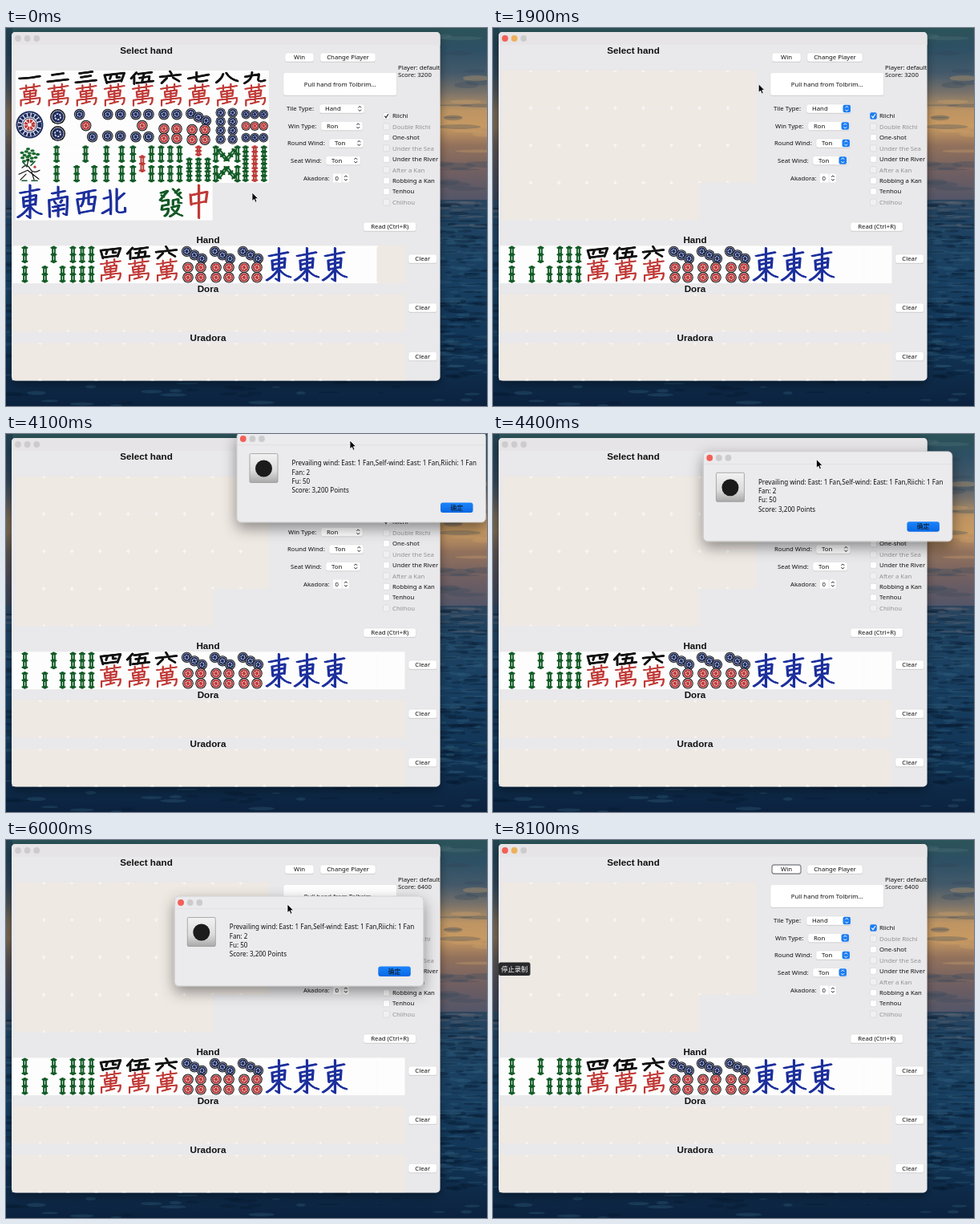
Recreate the animation shown at these times as an HTML page. Size 600 px wide and 471 px high, loop 8.2 s.

```html
<!DOCTYPE html>
<html lang="en">
<head>
<meta charset="utf-8">
<title>Mahjong hand calculator</title>
<style>
html, body { margin: 0; width: 100%; height: 100%; overflow: hidden; background: #12304b; }
#stage { display: block; width: 100vw; height: 100vh; }
text { font: 500 7.75px "Noto Sans", "Noto Sans CJK SC", sans-serif; fill: #111; white-space: pre; }
.title { font: bold 11.7px "Liberation Sans", Arial, sans-serif; }
.wide { font-size: 8.05px; }
.off { fill: #929294; }
.mid { text-anchor: middle; }
.accent { fill: none; }
.mark { stroke: #222; }
.accented .accent { fill: #1c7df3; }
.accented .mark { stroke: #fff; }
.light { fill: #cdcccd; }
.front .red, .dialog .red { fill: #f35f58; }
.front .yellow { fill: #eeb05c; }
</style>
</head>
<body>
<svg id="stage" viewBox="0 0 600 471" preserveAspectRatio="none"></svg>
<script>
const LOOP = 8200;
const BLUE = '#1c2f9c', GREEN = '#125a26', RED = '#c03a37', NAVY = '#1f2d5e', BLACK = '#111';
const stage = document.getElementById('stage');

let seed = 11;
const random = () => (seed = seed * 16807 % 2147483647) / 2147483647;
const times = (n, make) => Array.from({ length: n }, (_, i) => make(i)).join('');

const rect = (x, y, w, h, fill, more = '') =>
  `<rect x="${x}" y="${y}" width="${w}" height="${h}" fill="${fill}" ${more}/>`;
const circle = (x, y, r, fill, more = '') => `<circle cx="${x}" cy="${y}" r="${r}" fill="${fill}" ${more}/>`;
const line = (d, color, width) =>
  `<path d="${d}" fill="none" stroke="${color}" stroke-width="${width}" stroke-linecap="round" stroke-linejoin="round"/>`;
const text = (x, y, label, cls = '', id = '') =>
  `<text x="${x}" y="${y + 2.8}" class="${cls}" ${id && `id="${id}"`}>${label}</text>`;
const at = (x, y, body) => `<g transform="translate(${x} ${y})">${body}</g>`;

/* Tile faces, each in a 35 x 47 cell */
const numerals = [
  'M4 9Q17 10 31 8',
  'M10 5L25 4M4 13L31 12',
  'M9 3L26 2M11 8L24 7M4 14L31 13',
  'M5 5L8 15M5 5L31 4L27 14M8 14L27 13M14 5L12 10M21 5V9H25',
  'M10 2L3 9M7 7V16M12 4L30 3M20 4L17 15M14 9L27 8L26 14M10 15L32 14',
  'M17 1L19 4M4 7L31 6M13 9L6 15M21 9L29 14',
  'M4 9L31 6M15 2V12Q16 15 29 13',
  'M13 4Q11 10 4 14M17 3Q22 11 32 14',
  'M5 7L23 5L22 12Q23 15 31 13M14 2Q14 11 4 15'
];
const TEN_THOUSAND = 'M5 22L31 20M13 18V24M23 17V24M10 26L11 33L25 32L26 25L10 26M11 29.5L25 28.5' +
  'M18 25V39M6 43V36L31 35Q31 42 28 43M12 41L23 39';
const honors = {
  east: [BLUE, 'M5 12L30 9M10 30L9 18L26 16L25 28M10 23L25 21M10 29L25 27M18 3V44L14 41M17 30Q11 38 2 42M18 29Q25 38 33 40'],
  south: [BLUE, 'M10 13L27 11M13 23L15 26M23 22L21 25M11 30L26 28M11 35L26 33M18 28V42M18 5V17M6 21L7 42M7 21L30 18Q30 31 29 41L25 39'],
  west: [BLUE, 'M6 13L30 10M9 37L27 35M21 11V27H26M6 20L9 38M7 20L30 18L27 36M15 12Q15 25 11 29'],
  north: [BLUE, 'M4 19L13 17M31 14L22 21M12 9Q14 22 13 39M2 37L13 32M21 8V35Q22 39 32 37V32'],
  white: [BLACK, ''],
  green: [GREEN, 'M6 15L9 17M29 9L24 13M31 13L27 16M21 28V22L28 21V26H32M6 22L15 21V27L7 28' +
    'M5 12L14 10L4 21M21 8L32 20M7 28L6 33L15 32Q15 39 10 41M19 31L29 29Q27 38 17 42M20 33Q26 40 33 42'],
  red: [RED, 'M8 26L27 24M7 14L8 27M7 15L29 12L27 25M18 3V44']
};
/* A broad pen held at an angle: verticals come out thicker than horizontals */
const brush = (d, color, width, nib) => line(d, color, width) +
  at(nib / 2, nib / 5, line(d, color, width)) + at(-nib / 2, -nib / 5, line(d, color, width));
const leaning = body => `<g transform="translate(17.5 0) skewY(-4) scale(.95 1) translate(-17.5 0)">${body}</g>`;
const honor = name => leaning(brush(honors[name][1], honors[name][0], 1.9, 1.5));
const character = n => leaning(brush(numerals[n - 1], BLACK, 2.2, .9) + brush(TEN_THOUSAND, RED, 1.5, .8));

const pin = (x, y, color = NAVY, r = 6.8) => circle(x, y, r, BLACK) +
  circle(x, y, r * .8, color, `stroke="#d6d6e2" stroke-width="${r * .1}"`) +
  circle(x, y, r * .38, 'none', `stroke="#e4e4ee" stroke-width="${r * .17}" stroke-dasharray="${r * .25} ${r * .14}"`);
const pinGrid = (ys, color, xs = [9.5, 25.5], r) => ys.map(y => xs.map(x => pin(x, y, color, r)).join('')).join('');
const slope = (y, step, color) => times(3, i => pin(8 + i * 9.5, y + i * step, color, 6.6));
const dots = [
  () => circle(17.5, 21, 16, '#f2f0f6', `stroke="${NAVY}" stroke-width="2"`) +
    circle(17.5, 21, 12.3, 'none', `stroke="${NAVY}" stroke-width="4.6" stroke-dasharray="3.4 1.2"`) +
    circle(17.5, 21, 8.6, '#f6ebee', `stroke="${NAVY}" stroke-width="1"`) +
    circle(17.5, 21, 4.6, 'none', `stroke="${RED}" stroke-width="4.4" stroke-dasharray="2.6 1"`),
  () => pinGrid([11, 32], NAVY, [17.5], 9.5),
  () => pin(9.5, 8) + pin(17.5, 22, RED) + pin(25.5, 36),
  () => pinGrid([8, 35]),
  () => pinGrid([8, 36]) + pin(17.5, 22, RED),
  () => pinGrid([8]) + pinGrid([26, 38], RED),
  () => slope(7, 4.5) + pinGrid([27, 39.5], RED),
  () => pinGrid([6, 17, 28, 39], NAVY, [10, 25], 6.2),
  () => pinGrid([8, 37], NAVY, [6.5, 17.5, 28.5], 5.8) + pinGrid([22.5], RED, [6.5, 17.5, 28.5], 5.8)
];

const stick = (x, y, color = GREEN, h = 17, turn = 0) => {
  const e = h / 2;
  return `<g transform="translate(${x} ${y}) rotate(${turn})">` + line(`M0 ${-e}V${e}`, color, 4.8) +
    line(`M-2.9 ${-e}H2.9M-2.9 0H2.9M-2.9 ${e}H2.9`, color, 2.3) +
    line(`M0 ${2 - e}V-2.5M0 2.5V${e - 2}`, '#b9d9bd', 1.2) + '</g>';
};
const sticks = (xs, ys, color, h) => ys.map(y => xs.map(x => stick(x, y, color, h)).join('')).join('');
const trio = [6, 17.5, 29], pair = [11, 35.5];
const bamboos = [
  () => times(16, i => `<ellipse cx="${17 + Math.cos(i * 2.4) * Math.sqrt(i) * 3}" cy="${13 + Math.sin(i * 2.4) * Math.sqrt(i) * 2.2}"
      rx="2.6" ry="1.7" fill="#1a6a2f"/>`) +
    line('M16 17L14 27M8 28Q14 22 18 29T30 31M4 36L15 31L29 42M6 43L13 36M20 33L23 43', BLACK, 1.2) +
    line('M9 21L14 26M24 20L19 25M8 44H14M20 44H27', GREEN, 1.6) + circle(24, 27, 1.6, RED),
  () => sticks([16], pair),
  () => stick(17, pair[0]) + sticks([6, 28], [pair[1]]),
  () => sticks([8, 27], pair),
  () => sticks([6, 29], pair) + stick(17.5, 23, RED),
  () => sticks(trio, pair),
  () => stick(17.5, 7, RED, 9) + sticks(trio, [23, 38], GREEN, 11),
  () => sticks([4, 31], pair) + stick(12.5, 12, GREEN, 14, -40) + stick(22.5, 12, GREEN, 14, 40) +
    stick(12.5, 34, GREEN, 14, 40) + stick(22.5, 34, GREEN, 14, -40),
  () => sticks([6, 29], [8, 23, 38], GREEN, 11) + sticks([17.5], [8, 23, 38], RED, 11)
];
const paletteRows = [
  numerals.map((_, i) => character(i + 1)),
  dots.map(draw => draw()),
  bamboos.map(draw => draw()),
  Object.keys(honors).map(honor)
];
const handTiles = [
  ...[2, 3, 6].map(n => bamboos[n - 1]()),
  ...[4, 5, 6].map(character),
  ...[7, 7, 7].map(n => dots[n - 1]()),
  ...['east', 'east', 'east', 'white'].map(honor)
];

/* Empty slots: beige cells whose rounded corners leave small sparkles */
const STAR = 'M0-3Q.5-.5 3 0Q.5.5 0 3Q-.5.5-3 0Q-.5-.5 0-3Z';
const slots = (x, y, columns, w = 35, h = 46.6) =>
  `<svg x="${x}" y="${y}" width="${columns * w}" height="${h}">` + rect(0, 0, columns * w, h, '#efe9e3') +
  times(columns - 1, i => [0, h].map(v =>
    `<path d="${STAR}" transform="translate(${(i + 1) * w} ${v})" fill="#faf8f5"/>`).join('')) + '</svg>';

const PALETTE = { x: 12, y: 53, w: 35.1, h: 46.6 };
const rowY = i => PALETTE.y + i * PALETTE.h;
const palette = paletteRows.map((row, r) =>
  rect(PALETTE.x, rowY(r), row.length * PALETTE.w, PALETTE.h + .2, '#fdfdfd') +
  row.map((face, i) => at(PALETTE.x + i * PALETTE.w, rowY(r), face)).join('')).join('');
const emptyPalette = paletteRows.map((row, r) => slots(PALETTE.x, rowY(r), row.length, PALETTE.w)).join('');

/* Controls */
const button = (x, y, w, h, label, id = '') =>
  rect(x, y + .7, w, h, '#c9c8ca', 'rx="2.8"') +
  rect(x, y, w, h, '#fff', `rx="2.8" stroke="#dad9db" stroke-width=".5" ${id && `id="${id}"`}`) +
  text(x + w / 2, y + h / 2, label, 'mid');
const chevrons = (x, y, cls) =>
  `<path class="${cls}" d="M${x - 1.8} ${y - 1.2}l1.8-1.9l1.8 1.9M${x - 1.8} ${y + 1.2}l1.8 1.9l1.8-1.9" fill="none" stroke="#222" stroke-width="1"/>`;
const combo = (label, labelX, x, y, w, value) => text(labelX, y, label) +
  button(x, y - 5.5, w, 11, '') + text(x + 7, y, value) +
  `<rect x="${x + w - 10.5}" y="${y - 4.8}" width="9.6" height="9.6" rx="2.2" class="accent"/>` +
  chevrons(x + w - 5.7, y, 'mark');
const checkbox = (label, i) => {
  const y = 109.5 + i * 13.45, off = [1, 3, 5, 8].includes(i);
  return rect(470.5, y - 4, 8, 8, off ? '#f1f0f1' : '#fff', 'rx="1.8" stroke="#d2d1d3" stroke-width=".6"') +
    (i ? '' : `<rect x="470.3" y="${y - 4.2}" width="8.4" height="8.4" rx="1.9" class="accent"/>` +
      `<path class="mark" d="M472.4 ${y + .2}l1.6 2.1l2.9-4.6" fill="none" stroke-width="1.2"/>`) +
    text(482, y, label, off ? 'off' : '');
};
const lights = (x, y) => ['red', 'yellow', 'green'].map((c, i) =>
  `<circle cx="${x + i * 11.6}" cy="${y}" r="3.9" class="light ${c}"/>`).join('');

const controls =
  button(348, 31, 36, 11, 'Win', 'win') + button(392, 31, 69, 11, 'Change Player') +
  text(489, 49.5, 'Player: default') + text(489, 58.5, '', '', 'score') +
  button(346, 55.5, 141.5, 28.5, 'Pull hand from Tolbrim...') +
  combo('Tile Type:', 350, 391, 100.5, 56, 'Hand') +
  combo('Win Type:', 352, 393, 122, 52, 'Ron') +
  combo('Round Wind:', 351, 403, 143.5, 43, 'Ton') +
  combo('Seat Wind:', 355, 399, 165, 43, 'Ton') +
  text(371, 187, 'Akadora:') + rect(408, 181.5, 10.5, 11, '#fff') + text(410.5, 187, '0') +
  rect(419.5, 181.5, 8.5, 11, '#fff', 'rx="2.5"') + chevrons(423.8, 187, '') +
  ['Riichi', 'Double Riichi', 'One-shot', 'Under the Sea', 'Under the River', 'After a Kan',
    'Robbing a Kan', 'Tenhou', 'Chiihou'].map(checkbox).join('') +
  button(446, 242, 65.5, 11, 'Read (Ctrl+R)') +
  [287.5, 348.5, 409].map(y => button(502, y - 5.5, 35.5, 11, 'Clear')).join('');

const title = (x, y, label) => text(x, y + 1.3, label, 'title mid');
const mainWindow =
  rect(7, 5, 534.5, 434.5, '#e9e8ea', 'rx="5" filter="url(#shadow)"') +
  `<path d="M7 21V10Q7 5 12 5H536.5Q541.5 5 541.5 10V21Z" fill="#e6e4e6"/>` + lights(15, 13) +
  `<g id="empty">${emptyPalette}</g>` +
  `<g id="palette">${palette}${rect(152.4, 192.8, 35.1, 46.8, '#adadad', 'id="pressed"')}</g>` +
  slots(7.5, 271.3, 14) + rect(7.5, 271.3, 455, 46.8, '#fdfdfd') +
  handTiles.map((face, i) => at(7.5 + i * 35, 271.3, face)).join('') +
  rect(462.3, 271.3, 35.2, 46.8, '#fdfdfd', 'id="drawn"') +
  slots(7.5, 332, 14) + slots(7.5, 392.6, 14) +
  title(175, 28, 'Select hand') + title(252, 264, 'Hand') +
  title(252, 325, 'Dora') + title(252, 385.5, 'Uradora') + controls;

const dialog =
  rect(0, 0, 310.5, 112, '#ebeaec', 'rx="5.5" stroke="#bcbcbe" stroke-width=".6" filter="url(#deep)"') +
  rect(.5, 15.5, 309.5, .6, '#dbdadc') + lights(7.8, 8) +
  '<g id="message">' +
  rect(16, 26.5, 35, 36, 'url(#metal)', 'rx="1.5" stroke="#8f8f8f" stroke-width=".7"') + circle(33.5, 45, 10.5, '#1b1b1b') +
  ['Prevailing wind: East: 1 Fan,Self-wind: East: 1 Fan,Riichi: 1 Fan', 'Fan: 2', 'Fu: 50', 'Score: 3,200 Points']
    .map((s, i) => text(68.5, 38.5 + i * 11.2, s, 'wide')).join('') +
  rect(254, 87.5, 40.5, 12.5, 'url(#blue)', 'rx="3"') + text(274.2, 93.7, '确定', 'mid') + '</g>';

/* Desktop */
const gradient = (id, stops) => `<linearGradient id="${id}" x2="0" y2="1">` +
  stops.map(([o, c]) => `<stop offset="${o}" stop-color="${c}"/>`).join('') + '</linearGradient>';
const blob = (x, y, rx, ry, fill, opacity) =>
  `<ellipse cx="${x}" cy="${y}" rx="${rx}" ry="${ry}" fill="${fill}" opacity="${opacity}"/>`;
const desktop = rect(0, 0, 600, 215, 'url(#sky)') + rect(0, 214, 600, 257, 'url(#sea)') +
  rect(0, 0, 8, 214, '#142c40', 'opacity=".45"') +
  times(26, () => {
    const y = 10 + random() * 200;
    return blob(545 + random() * 55, y, 10 + random() * 20, 1 + random() * 3,
      random() > .45 ? '#33465a' : y > 60 ? '#d3a56c' : '#56787a', .3);
  }) +
  times(260, () => {
    const y = 217 + random() * 254, x = y > 436 ? random() * 600 : random() > .12 ? 540 + random() * 60 : random() * 8;
    return blob(x, y, 3 + random() * 14, .6 + random() * 1.8,
      random() > .4 ? '#06172d' : y < 250 ? '#6d6c76' : '#33617f', .34);
  });

stage.innerHTML = '<defs>' +
  gradient('sky', [[0, '#2b5358'], [.12, '#2d5064'], [.26, '#43596a'], [.37, '#77716a'], [.48, '#bd9463'], [.57, '#c89a62'],
    [.68, '#93725c'], [.84, '#705f62'], [1, '#525568']]) +
  gradient('sea', [[0, '#2c455e'], [.1, '#1f4260'], [.4, '#183f61'], [.7, '#113556'], [1, '#0b223e']]) +
  gradient('metal', [[0, '#f2f2f2'], [.6, '#dcdcdc'], [1, '#a9a9a9']]) +
  gradient('blue', [[0, '#1a84fb'], [1, '#0968e4']]) +
  '<filter id="shadow" x="-10%" y="-10%" width="120%" height="120%"><feDropShadow dx="0" dy="4" stdDeviation="6" flood-opacity=".4"/></filter>' +
  '<filter id="deep" x="-20%" y="-30%" width="140%" height="180%"><feDropShadow dx="0" dy="7" stdDeviation="9" flood-opacity=".42"/></filter>' +
  '</defs>' + desktop + `<g id="main">${mainWindow}</g><g id="dialog" class="dialog">${dialog}</g>` +
  `<g id="tooltip">${rect(7, 152.5, 39.5, 16.5, '#29292c', 'rx="2.5"')}` +
  '<text x="26.7" y="163.8" class="mid" style="fill:#fff;font-size:8.2px">停止录制</text></g>' +
  '<path id="cursor" d="M0 0V10.6L2.5 8.4L4.1 12.2L6 11.4L4.4 7.7H7.6Z" fill="#000" stroke="#fff" stroke-width=".8"/>';

/* Motion */
const part = Object.fromEntries([...stage.querySelectorAll('[id]')].map(el => [el.id, el]));
const cursorPath = [[0, 307, 205], [650, 170, 213], [1100, 170, 213], [2200, 367, 38], [2700, 371, 38],
  [3100, 371, 38], [4000, 429, 8], [4150, 429, 8], [4800, 352, 79], [5200, 351, 80], [6000, 351, 80],
  [7100, 480, 169], [7400, 480, 169], [8000, -15, 160]];
const dialogPath = [[4150, 288, -2], [4800, 211, 69.5], [5200, 210.3, 70]];

function position(path, t) {
  const next = path.findIndex(([time]) => time > t);
  if (next < 1) return path.at(next).slice(1);
  const [t0, x0, y0] = path[next - 1], [t1, x1, y1] = path[next];
  const u = (t - t0) / (t1 - t0), k = u * u * (3 - 2 * u);
  return [x0 + (x1 - x0) * k, y0 + (y1 - y0) * k];
}
const show = (el, on) => el.setAttribute('visibility', on ? 'visible' : 'hidden');
const move = (el, path, t) => el.setAttribute('transform', `translate(${position(path, t)})`);

function render(t) {
  const open = t >= 2800 && t < 7400, front = t >= 700 && !open, full = t >= 1000;
  part.main.classList.toggle('front', front);
  part.main.classList.toggle('accented', front || (open && t < 3000));
  show(part.palette, !full);
  show(part.pressed, t >= 700 && !full);
  show(part.empty, full);
  show(part.drawn, full);
  part.win.setAttribute('stroke', front && t >= 2500 ? '#898c91' : '#dad9db');
  part.win.setAttribute('stroke-width', front && t >= 2500 ? 1.4 : .5);
  part.score.textContent = `Score: ${t < 2800 ? 3200 : 6400}`;
  show(part.dialog, open);
  show(part.message, open && t >= 3000);
  move(part.dialog, dialogPath, t);
  move(part.cursor, cursorPath, t);
  show(part.tooltip, t >= 8000);
}

const start = performance.now();
function tick() {
  render((performance.now() - start) % LOOP);
  requestAnimationFrame(tick);
}
tick();
</script>
</body>
</html>
```
